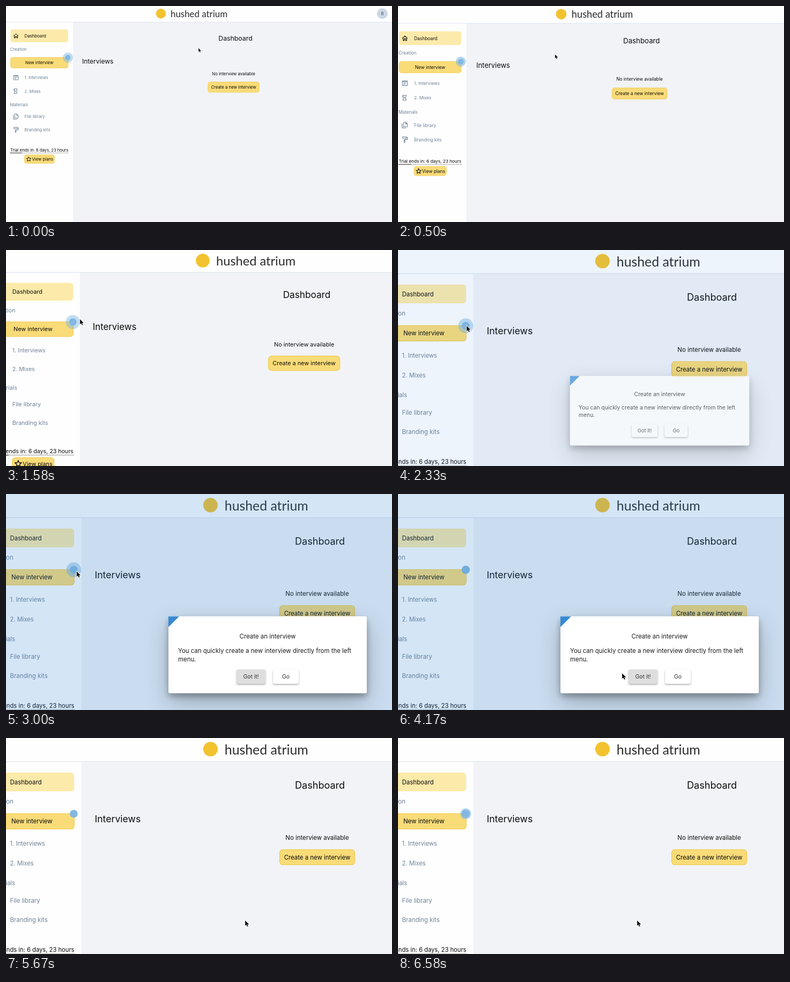
Recreate the animation shown at these times as an HTML page with a canvas. Size 720x405 px, loop 6.66 s.

```html
<!DOCTYPE html>
<html lang="en">
<head>
<meta charset="utf-8">
<title>Dashboard tour</title>
<style>
html, body { margin: 0; width: 100%; height: 100%; overflow: hidden; background: #fff; }
canvas { display: block; width: 720px; height: 405px; }
</style>
</head>
<body>
<canvas id="stage"></canvas>
<script>
const W = 720, H = 405, LOOP = 6660;
const ZOOM = 1.469, PIVOT_X = 92;
const OPEN = 2.284, CLOSE = 5.301;
const SANS = 'Inter, sans-serif';
const SLATE = '#6f8296', INK = '#0c0c0c', YELLOW = '#f9db78', EDGE = '#f1cb4e', BLUE = '45,131,208';

const dpr = window.devicePixelRatio || 1;
const stage = document.getElementById('stage');
const layer = document.createElement('canvas');
for (const c of [stage, layer]) { c.width = W * dpr; c.height = H * dpr; }
const main = stage.getContext('2d'), pop = layer.getContext('2d');

const clamp = v => Math.min(1, Math.max(0, v));
const smooth = v => { v = clamp(v); return v * v * (3 - 2 * v); };
const cubic = (a, b, u) => 3 * a * u * (1 - u) ** 2 + 3 * b * u * u * (1 - u) + u ** 3;

function bezier(x1, y1, x2, y2) {
  return v => {
    v = clamp(v);
    let lo = 0, hi = 1;
    for (let i = 0; i < 24; i++) {
      const mid = (lo + hi) / 2;
      if (cubic(x1, x2, mid) < v) lo = mid; else hi = mid;
    }
    return cubic(y1, y2, (lo + hi) / 2);
  };
}
const backdropEase = bezier(.25, .8, .25, 1);
const enterEase = bezier(0, 0, .2, 1);
const exitEase = bezier(.4, 0, .2, 1);

function label(g, str, x, y, size, color = INK, align = 'left', font = SANS) {
  g.font = `${size}px ${font}`;
  g.fillStyle = color;
  g.textAlign = align;
  g.fillText(str, x, y + size * .38);
}

function box(g, x, y, w, h, r, fill, stroke) {
  g.beginPath();
  g.roundRect(x, y, w, h, r);
  g.fillStyle = fill;
  g.fill();
  if (stroke) { g.strokeStyle = stroke; g.lineWidth = .8; g.stroke(); }
}

function disc(g, x, y, r, fill) {
  g.beginPath();
  g.arc(x, y, r, 0, 7);
  g.fillStyle = fill;
  g.fill();
}

function icon(g, x, y, path, color = SLATE, fill) {
  g.save();
  g.translate(x, y);
  const p = new Path2D(path);
  if (fill) { g.fillStyle = fill; g.fill(p); }
  g.strokeStyle = color;
  g.lineWidth = 1;
  g.stroke(p);
  g.restore();
}

function shadow(g, color, blur, dy) {
  g.shadowColor = color;
  g.shadowBlur = blur * dpr;
  g.shadowOffsetY = dy * dpr;
}

function starPath(r) {
  let d = '';
  for (let i = 0; i < 10; i++) {
    const a = i * Math.PI / 5 - Math.PI / 2, q = i % 2 ? r * .45 : r;
    d += (i ? 'L' : 'M') + (q * Math.cos(a)).toFixed(2) + ' ' + (q * Math.sin(a)).toFixed(2);
  }
  return d + 'Z';
}
const STAR = starPath(4.5);

function drawPage(g, t) {
  g.fillStyle = '#f1f3f7';
  g.fillRect(0, 0, 820, 420);
  g.fillStyle = '#fefeff';
  g.fillRect(0, 30, 125, 390);
  g.fillRect(0, 0, 820, 30);
  g.fillStyle = '#d8e1ec';
  g.fillRect(0, 29.8, 820, .7);

  disc(g, 289, 14.2, 9.2, '#f3c22f');
  label(g, 'hushed atrium', 307, 14.4, 16.9, '#2b2b2b', 'left', 'Lato, sans-serif');
  disc(g, 702, 14.3, 10, '#cbd7e4');
  label(g, 'B', 702, 14.3, 7.2, '#32414f', 'center');

  box(g, 8.5, 44, 107.4, 24, 4, '#fceaaa');
  icon(g, 18.6, 56, 'M-4.4 .2L0-3.8L4.4 .2M-3.1-.8V3.9H-1.1V.9H1.1V3.9H3.1V-.8', INK);
  label(g, 'Dashboard', 34.5, 56, 7.8);
  label(g, 'Creation', 7.5, 81, 7.8, SLATE);
  box(g, 8.6, 96.5, 107.4, 19.7, 4, YELLOW, EDGE);
  label(g, 'New interview', 62.2, 106.3, 7.75, INK, 'center');

  icon(g, 18.5, 134.3, 'M-4.2-4H4.2V4H-4.2ZM-4.2-3H4.2M-2.2-.6H2.2M-2.2 1.5H.8');
  label(g, '1. Interviews', 34.5, 134.6, 7.6, SLATE);
  icon(g, 18, 159.6, 'M-3-4.3H2.8L1.8 0H-1.8ZM-3-4.3V-1H-1.6M-1.8 0L-2.8 4.3H2.8L1.8 0');
  label(g, '2. Mixes', 34.5, 159.8, 7.6, SLATE);
  label(g, 'Materials', 7.5, 184.6, 7.75, SLATE);
  icon(g, 18.4, 207, 'M-2.2-4.8H1.6L4.4-2V3H-2.2ZM1.4-4.8V-1.8H4.4M-4.6-2.8V5.2H2.4');
  label(g, 'File library', 34.5, 207.2, 7.75, SLATE);
  icon(g, 18.6, 232, 'M-4-4.6H2.8V-2H-4ZM2.8-3.6H4.4V.2H-.6V1.2M-1.4 1.2H.2V5H-1.4Z');
  label(g, 'Branding kits', 34.5, 232.2, 7.75, SLATE);

  label(g, 'Trial ends in: 6 days, 23 hours', 8, 269.8, 7.62);
  g.fillStyle = '#cfcfcf';
  g.fillRect(7.5, 274.6, 109.5, 1.8);
  g.fillStyle = '#8b8b8b';
  g.fillRect(7.5, 274.6, 22, 1.8);
  box(g, 34.5, 279, 55.8, 16, 4, YELLOW, EDGE);
  icon(g, 42.4, 287.3, STAR, INK, '#fbe7a4');
  label(g, 'View plans', 48.5, 287.2, 7.72);

  label(g, 'Dashboard', 428, 60, 12.3, INK, 'center');
  label(g, 'Interviews', 142, 103, 12);
  label(g, 'No interview available', 424.5, 126.8, 7.75, INK, 'center');
  box(g, 376.9, 142.5, 95.3, 19.3, 4, YELLOW, EDGE);
  label(g, 'Create a new interview', 424.5, 152.1, 7.78, INK, 'center');

  drawBeacon(g, t);
}

function drawBeacon(g, t) {
  const p = ((t + .53) / .78) % 1;
  if (p < .8) {
    const r = 5 + 4.5 * (1 - (1 - clamp(p / .75)) ** 3);
    disc(g, 115.4, 96.7, r, `rgba(125,182,226,${.7 - .35 * p})`);
  }
  disc(g, 115.4, 96.7, 5, '#82b8e0');
}

function popButton(g, str, x, w, fill) {
  shadow(g, 'rgba(0,0,0,.35)', 3, 1.5);
  box(g, x, 329, w, 27, 3, fill);
  shadow(g, 'transparent', 0, 0);
  label(g, str, x + w / 2, 342.3, 10.4, '#333', 'center');
}

function drawDialog(t) {
  if (t < OPEN || t > CLOSE + .075) return;
  const enter = enterEase((t - OPEN) / .15);
  const g = pop, scale = .7 + .3 * enter;
  g.setTransform(dpr, 0, 0, dpr, 0, 0);
  g.clearRect(0, 0, W, H);
  g.translate(488, 301.2);
  g.scale(scale, scale);
  g.translate(-488, -301.2);

  shadow(g, 'rgba(0,0,0,.25)', 44, 16);
  box(g, 303, 229.4, 370, 144, 3, '#fff');
  shadow(g, 'rgba(0,0,0,.3)', 12, 6);
  box(g, 303, 229.4, 370, 144, 3, '#fff');
  shadow(g, 'transparent', 0, 0);
  g.beginPath();
  g.moveTo(303, 229.4);
  g.lineTo(323, 229.4);
  g.lineTo(303, 249.4);
  g.fillStyle = '#3789d2';
  g.fill();
  label(g, 'Create an interview', 488, 266.6, 11.45, '#1c1c1c', 'center');
  label(g, 'You can quickly create a new interview directly from the left', 321, 294, 11.45, '#1c1c1c');
  label(g, 'menu.', 321, 310, 11.45, '#1c1c1c');
  popButton(g, 'Got it!', 430, 54, t > 2.45 ? '#dedede' : '#fff');
  popButton(g, 'Go', 498, 48, '#fff');

  main.save();
  main.setTransform(1, 0, 0, 1, 0, 0);
  main.globalAlpha = enter * (1 - exitEase((t - CLOSE) / .075));
  main.drawImage(layer, 0, 0);
  main.restore();
}

// Waypoints: seconds, x, y in page space
const APPROACH = [[0, 359, 79], [.917, 211, 88.3], [1.583, 124.9, 92.9], [1.83, 116.5, 96.7]];

function pointer(t) {
  if (t > 2.9) {
    const p = (t - 2.9) / 1.55;
    return [116.5 + 216.5 * smooth(p), 96.7 + 136.1 * smooth(p * 1.1)];
  }
  for (let i = 1; i < APPROACH.length; i++) {
    const [t0, x0, y0] = APPROACH[i - 1], [t1, x1, y1] = APPROACH[i];
    if (t < t1) {
      const k = (t - t0) / (t1 - t0);
      return [x0 + (x1 - x0) * k, y0 + (y1 - y0) * k];
    }
  }
  return [116.5, 96.7];
}

const ARROW = new Path2D('M0 0V7L1.6 5.5L2.7 8L3.9 7.5L2.8 5.1H5Z');
const HAND = new Path2D('M-.7 .4Q0-.5 .7 .4V3Q1.5 2.4 2 3.1Q2.8 2.6 3.2 3.4Q4.2 3 4.3 4.1V5.8' +
  'Q4.2 7 3.5 8.4H-.4Q-1 7.3-2.6 5.4Q-3.2 4.3-2.2 4.2Q-1.4 4.4-.7 5.3Z');

function drawPointer(g, t) {
  const [x, y] = pointer(t);
  const hand = t > 4.24 && t < CLOSE + .1;
  const shape = hand ? HAND : ARROW;
  g.save();
  g.translate(x, y);
  g.lineJoin = 'round';
  g.lineWidth = 1.2;
  g.strokeStyle = hand ? '#111' : '#fff';
  g.fillStyle = hand ? '#fff' : '#111';
  g.stroke(shape);
  g.fill(shape);
  g.restore();
}

function render(t) {
  const zoom = 1 + (ZOOM - 1) * clamp((t - .233) / 1.6);
  const camera = () => main.setTransform(dpr * zoom, 0, 0, dpr * zoom, -PIVOT_X * (zoom - 1) * dpr, 0);
  camera();
  drawPage(main, t);

  main.setTransform(dpr, 0, 0, dpr, 0, 0);
  const dim = backdropEase((t - OPEN) / .4) - backdropEase((t - CLOSE) / .4);
  main.fillStyle = `rgba(${BLUE},${(.2 * dim).toFixed(4)})`;
  main.fillRect(0, 0, W, H);
  drawDialog(t);

  camera();
  drawPointer(main, t);
}

// Motion advances at twelve poses per second
function tick() {
  const ms = performance.now() % LOOP;
  render(Math.floor((ms / 10 + .5) * .12) / 12);
  requestAnimationFrame(tick);
}
tick();
</script>
</body>
</html>
```
